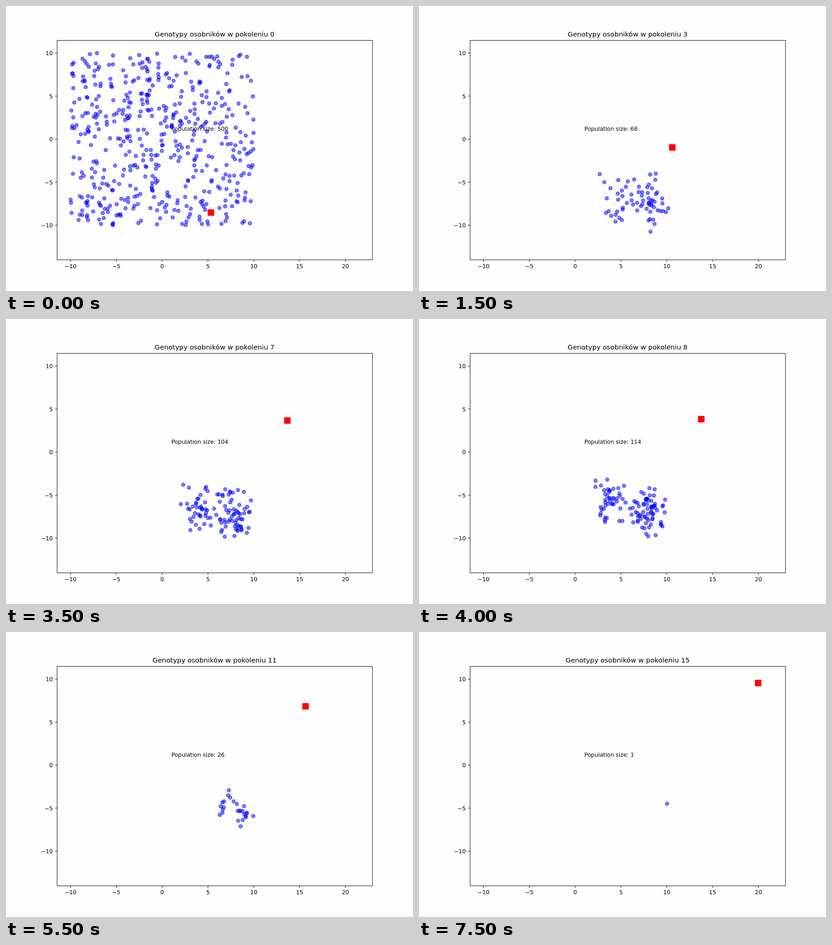
Recreate the animation shown at these times as an HTML page with a canvas. Size 894x626 px, loop 8 s.

```html
<!DOCTYPE html>
<html lang="pl">
<head>
<meta charset="utf-8">
<title>Genotypy</title>
<style>
html, body { margin: 0; width: 100%; height: 100%; overflow: hidden; background: #fefefe; }
canvas { display: block; }
</style>
</head>
<body>
<canvas id="stage" width="894" height="626"></canvas>
<script>
const ctx = document.getElementById('stage').getContext('2d');
const STEP = 500;
const GENERATIONS = 16;
const FONT = '"DejaVu Sans", sans-serif';
const AXES = { l: 112.2, t: 75.55, r: 805, b: 557.6 };
const px = x => 343 + 20.13 * x;
const py = y => 292.4 - 18.9 * y;

// Key generations; values in between are interpolated
const SIZE = [[0, 500], [1, 57], [3, 68], [5, 98], [7, 104], [9, 123], [11, 26], [14, 4], [15, 1]];
const GOAL = [[0, 450, 453.6], [3, 556.4, 310.6], [5, 614.1, 229.1], [8, 620, 220], [9, 656.2, 175.6],
  [12, 658.8, 157], [13, 712.5, 133], [14, 714.3, 129], [15, 745, 112.1]];
// Centre of the left group, centre of the right group, spread
const CLOUD = [[3, 432, 426, 509, 428, 27], [7, 422, 412, 500, 428, 25], [9, 425, 392, 508, 428, 20],
  [11, 478, 376, 518, 395, 15], [14, 500, 374, 535, 386, 14], [15, 545, 377, 545, 377, 0]];
const LEFT_SHARE = .38;

function at(keys, gen) {
  const next = keys.find(k => k[0] >= gen);
  const prev = keys[Math.max(0, keys.indexOf(next) - 1)];
  const f = next === prev ? 0 : (gen - prev[0]) / (next[0] - prev[0]);
  return prev.slice(1).map((v, i) => v + (next[i + 1] - v) * f);
}

function random(seed) {
  let s = seed;
  return () => {
    s = s + 0x6D2B79F5 | 0;
    let v = Math.imul(s ^ s >>> 15, 1 | s);
    v = v + Math.imul(v ^ v >>> 7, 61 | v) ^ v;
    return ((v ^ v >>> 14) >>> 0) / 4294967296;
  };
}

function populate(gen) {
  const rnd = random(gen * 97 + 11);
  const bell = () => (rnd() + rnd() - 1) * 2.45;
  const [lx, ly, rx, ry, spread] = at(CLOUD, gen);
  const n = Math.round(at(SIZE, gen)[0]);
  return Array.from({ length: n }, (_, i) => {
    if (gen === 0) return [px(rnd() * 20 - 10), py(rnd() * 20 - 10)];
    const [cx, cy] = i < n * LEFT_SHARE ? [lx, ly] : [rx, ry];
    return [cx + bell() * spread * .75, cy + bell() * spread * 1.05];
  });
}

const dots = Array.from({ length: GENERATIONS }, (_, gen) => populate(gen));

function label(text, x, y, size, align) {
  ctx.font = size + 'px ' + FONT;
  ctx.textAlign = align;
  ctx.fillText(text, x, y);
}

function line(x1, y1, x2, y2) {
  ctx.beginPath();
  ctx.moveTo(x1, y1);
  ctx.lineTo(x2, y2);
  ctx.stroke();
}

function drawAxes() {
  const name = v => String(v).replace('-', '\u2212');
  ctx.strokeStyle = ctx.fillStyle = '#000';
  ctx.lineWidth = 1;
  ctx.strokeRect(AXES.l, AXES.t, AXES.r - AXES.l, AXES.b - AXES.t);
  for (let v = -10; v <= 20; v += 5) {
    line(px(v), AXES.b, px(v), AXES.b + 4.4);
    label(name(v), px(v), 576.2, 12.42, 'center');
    if (v > 10) continue;
    line(AXES.l - 4.4, py(v), AXES.l, py(v));
    label(name(v), 102.9, py(v) + 4.7, 12.42, 'right');
  }
}

function drawDots(list) {
  ctx.fillStyle = ctx.strokeStyle = 'rgba(0,0,255,.5)';
  ctx.lineWidth = 1.7;
  for (const [x, y] of list) {
    ctx.beginPath();
    ctx.arc(x, y, 3.73, 0, Math.PI * 2);
    ctx.fill();
    ctx.stroke();
  }
}

function draw(gen) {
  const [gx, gy] = at(GOAL, gen);
  ctx.fillStyle = '#fefefe';
  ctx.fillRect(0, 0, 894, 626);
  drawDots(dots[gen]);
  ctx.fillStyle = '#f00';
  ctx.fillRect(gx - 7.1, gy - 7.1, 14.2, 14.2);
  drawAxes();
  label('Genotypy osobników w pokoleniu ' + gen, 458.2, 67.3, 14.9, 'center');
  label('Population size: ' + dots[gen].length, px(1), py(1), 12.42, 'left');
}

let shown = -1;
function tick() {
  const gen = Math.floor(performance.now() / STEP) % GENERATIONS;
  if (gen !== shown) draw(shown = gen);
  requestAnimationFrame(tick);
}
tick();
</script>
</body>
</html>
```
